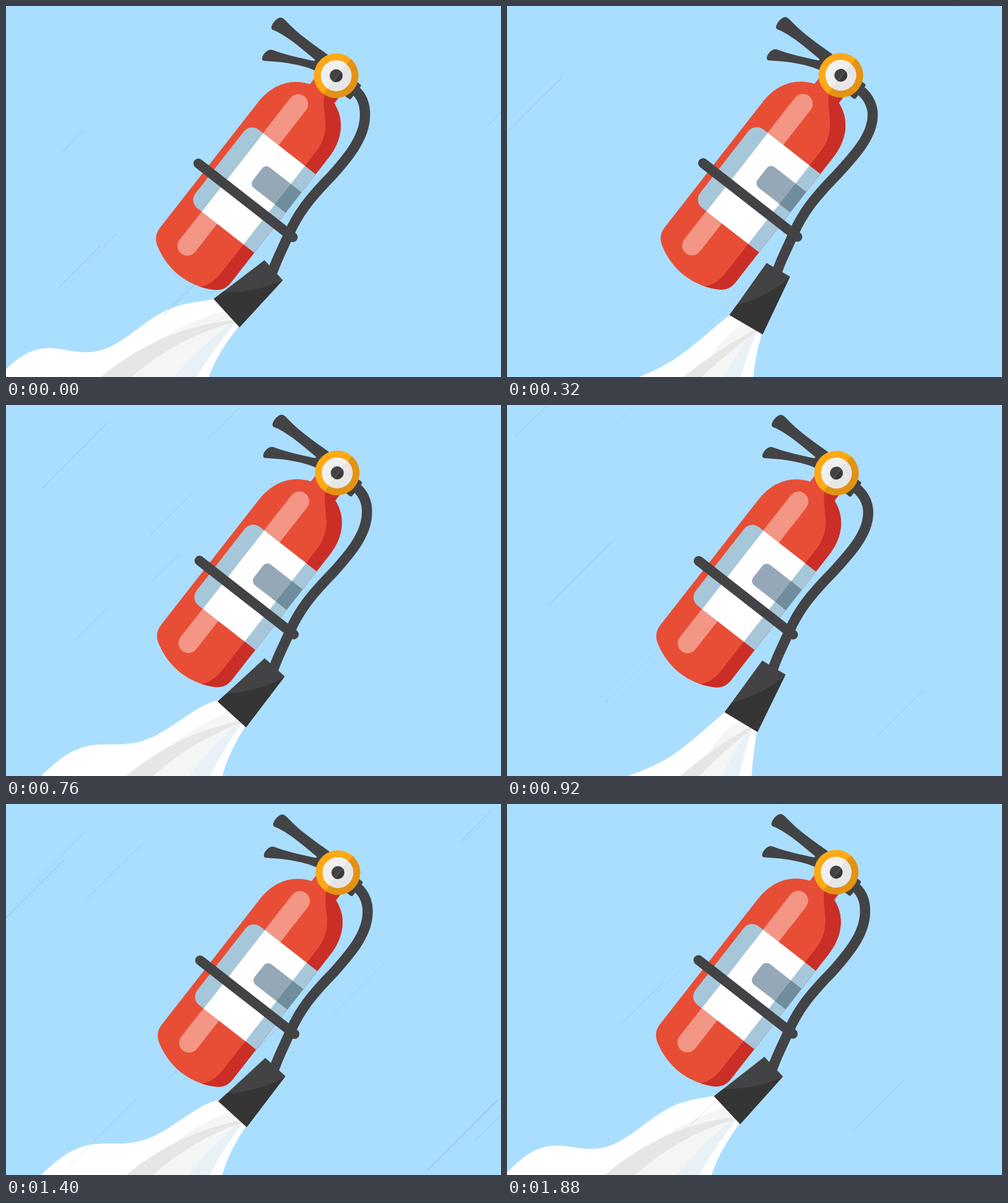
An HTML page with a canvas that plays this animation: 800x600 px, repeating every 1.92 s.

```html
<!DOCTYPE html>
<html lang="en">
<head>
<meta charset="utf-8">
<title>Flying fire extinguisher</title>
<style>
html, body { margin: 0; width: 100%; height: 100%; overflow: hidden; background: #aadeff; }
canvas { display: block; }
</style>
</head>
<body>
<canvas id="stage" width="800" height="600"></canvas>
<script>
const c = document.getElementById('stage').getContext('2d');
const { sin, cos, sqrt, max, abs, floor, PI } = Math;
const LOOP = 1920, SWING = 640, STEP = 40, FLOOR = 600, TILT = 38 * PI / 180;
const PIVOT = [432.5, 428.5], GAUGE = [533.5, 114], DARK = '#434345';

let seed = 7;
const rnd = () => (seed = seed * 16807 % 2147483647) / 2147483647;
const streaks = Array.from({ length: 150 }, () => ({
  time: rnd() * LOOP, x: rnd() * 900, y: rnd() * 600 - 30, run: 35 + rnd() * 80
}));

const mix = (a, b, k) => a + (b - a) * k;

function fill(shape, color) {
  c.fillStyle = color;
  c.fill(typeof shape === 'string' ? new Path2D(shape) : shape);
}

function stroke(shape, color, width) {
  c.strokeStyle = color;
  c.lineWidth = width;
  c.lineCap = 'round';
  c.stroke(new Path2D(shape));
}

function rect(x, y, w, h, color, r = 0) {
  c.fillStyle = color;
  c.beginPath();
  c.roundRect(x, y, w, h, r);
  c.fill();
}

function disc(r, color) {
  c.fillStyle = color;
  c.beginPath();
  c.arc(0, 0, r, 0, 7);
  c.fill();
}

// Every fold of the smoke meets the floor at a point that swings with the nozzle
function drawSmoke(wave, toStage) {
  const grey = 219 - 66 * wave, light = 259 - 56 * wave, blue = 310 - 40 * wave;
  const white = 343 - 35 * wave, right = 363 - 35 * wave, end = 100 - 113 * wave;
  const left = toStage(-29, 99), edge = toStage(29, 100), [nx, ny] = toStage(17, 101);

  // Left edge: a straight run to the floor plus a growing ripple
  const p = new Path2D();
  p.moveTo(...left);
  for (let s = 0; s <= 1.2; s += .02) {
    const ripple = sin(PI * ((2 + wave) * s - max(0, wave)));
    p.lineTo(mix(left[0], end, s), mix(left[1], FLOOR, s) + (19 + 5 * wave) * sqrt(s) * ripple);
  }
  p.lineTo(end - 80, 640);
  p.lineTo(right, 640);
  p.lineTo(right, FLOOR);
  p.quadraticCurveTo(mix(right, edge[0], .25), 562, ...edge);
  fill(p, '#fff');

  // A fold between two floor points; each side bends at a given drop
  const fold = (x1, drop1, x2, drop2, color) => {
    const bend = (x, drop) => `${mix(x, nx, .45)},${mix(ny, FLOOR, drop)}`;
    fill(`M${nx},${ny}Q${bend(x1, drop1)} ${x1},${FLOOR}H${x2}Q${bend(x2, drop2)} ${nx + 3},${ny + 3}Z`, color);
  };
  const high = .29 - .16 * wave, low = .4 - .11 * wave;
  const [sx, sy] = toStage(-4, 101);
  const ex = mix(nx, grey, .65), ey = mix(ny, FLOOR, .55 - .08 * wave);
  fill(`M${sx},${sy}Q${mix(sx, ex, .5)},${mix(sy, ey, .3)} ${ex},${ey}L${nx},${ny}Z`, '#f5f5f5');
  fold(light, low, blue, .45, '#f5f5f5');
  fold(blue, .45, white, .5, '#e8f2f6');
  fold(grey, high, light, low, '#e6e6e6');
}

function drawStreaks(t) {
  c.lineCap = 'butt';
  c.strokeStyle = '#7f929e';
  for (const s of streaks) {
    const age = ((t - s.time) % LOOP + LOOP * 1.5) % LOOP - LOOP / 2;
    const fade = 1 - abs(age) / 80;
    if (fade <= 0) continue;
    const x = s.x - age * 2.5, y = s.y + age * 2.5;
    c.globalAlpha = fade * (.08 + s.run / 600);
    c.lineWidth = 1 + s.run / 130;
    c.beginPath();
    c.moveTo(x, y);
    c.lineTo(x - s.run, y + s.run);
    c.stroke();
  }
  c.globalAlpha = 1;
}

const TANK = new Path2D('M-25,20V37C-55,48-73,75-73,112V368C-73,382-67,390-56,396' +
  'C-20,415.5 20,415.5 55,396C66,390 72,382 72,368V112C72,75 55,48 25,37V20Z');

// Upright tank, hanging from the gauge
function drawTank() {
  fill(TANK, '#e84e36');
  c.save();
  c.clip(TANK);
  fill('M0,20C2,58 48,62 50,115V365Q50,394 33,408L80,420V20Z', '#c92f27');
  rect(-36, 58, 32, 323, '#f39685', 16);
  rect(-62, 146, 140, 161, '#a6c7d9', [17, 0, 0, 17]);
  rect(-35.5, 146, 85.5, 161, '#fff');
  rect(-2, 183, 80, 42, '#96a8b7', [9, 0, 0, 9]);
  rect(50, 183, 30, 42, '#708d9d');
  c.restore();
  stroke('M-88,249H105.5', DARK, 16);
}

function drawGauge() {
  rect(26, -13, 16, 30, DARK, 3);
  disc(36, '#ffa915');
  disc(25, '#f0f0f0');
  disc(10.5, '#434345');
  c.save();
  c.beginPath();
  c.rect(2, -40, 40, 80);
  c.clip();
  disc(36, '#e39213');
  disc(25, '#e6e6e6');
  disc(10.5, '#38383a');
  c.restore();
}

function drawHose(wave) {
  const x = 582.5 - 2.5 * wave;
  stroke(`M558,134C574,142 ${x + 1},160 ${x},180C${x - 1},215 552,247 527,275` +
    'C488,315 472,337 457,370C448,392 440,405 431,430', DARK, 16.5);
}

function drawLevers() {
  fill('M429,37C428,32 436,21 443,20C447,20 449,22 452,25C470,45 495,62 520,80L508,96L498,87' +
    'C480,72 455,50 434,41C431,40 429,39 429,37Z', DARK);
  fill('M414,87C413,82 421,72 427,72C432,72 434,74 438,75C455,81 478,86 497,90Q501,89 499,86L510,90' +
    'L500,106C480,97 455,92 418,90Q414,90 414,87Z', DARK);
}

function draw(t) {
  const wave = cos(t / SWING * 2 * PI), angle = (39 + 8.6 * wave) * PI / 180;

  // Slow drift with a quick rattle on top
  const a = t / LOOP * 2 * PI, rattle = cos(12 * a), kick = sin(12 * a);
  const ox = 2 - 3 * cos(2 * a) + 1.6 * sin(a) + 1.1 * rattle + .4 * kick;
  const oy = -3.3 - .7 * sin(a) + 2 * rattle + .5 * kick;

  const toStage = (x, y) => [
    PIVOT[0] + ox + x * cos(angle) - y * sin(angle),
    PIVOT[1] + oy + x * sin(angle) + y * cos(angle)
  ];

  c.fillStyle = '#aadeff';
  c.fillRect(0, 0, 800, 600);
  drawSmoke(wave, toStage);
  drawStreaks(t);

  c.save();
  c.translate(ox, oy);
  drawHose(wave);
  drawLevers();

  c.save();
  c.translate(...GAUGE);
  c.rotate(TILT);
  drawTank();
  drawGauge();
  c.restore();

  // Nozzle
  c.translate(...PIVOT);
  c.rotate(angle);
  fill('M-22,0H22L31,103H-31Z', '#434345');
  fill('M22,2L31,103H-31L-29.4,84Q6,48 22,2Z', '#353535');
  c.restore();
}

const start = performance.now();
function tick() {
  const t = (performance.now() - start) % LOOP;
  draw(floor(t / STEP) * STEP);
  requestAnimationFrame(tick);
}
tick();
</script>
</body>
</html>
```
